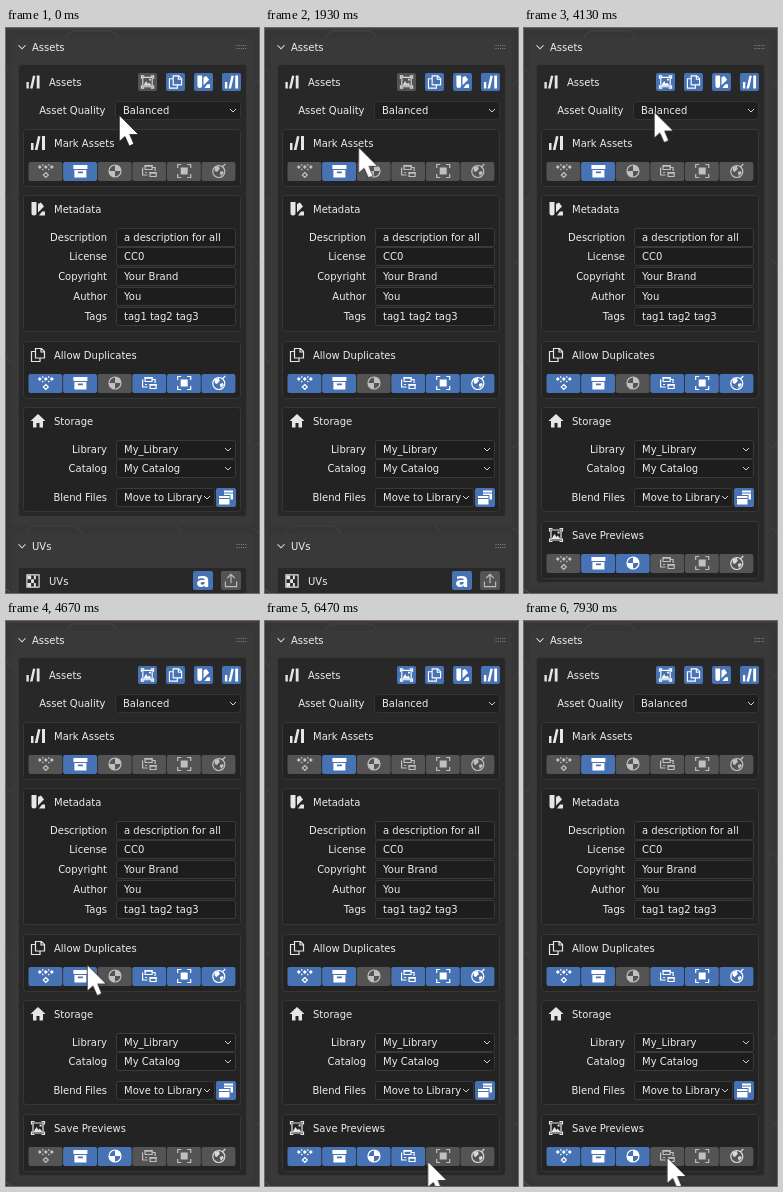
Write an HTML page that moves like this. It is 253x565 px and loops after 8 s.

```html
<!DOCTYPE html>
<html lang="en">
<head>
<meta charset="utf-8">
<title>Asset panel</title>
<style>
html, body { margin: 0; width: 100%; height: 100%; overflow: hidden; background: #363636; }
svg { display: block; width: 253px; height: 565px; }
text { font: 10px "DejaVu Sans", sans-serif; fill: #ececec; }
.off { fill: #545454; color: #c0c0c0; }
.on { fill: #4772b3; color: #fff; }
.early, .late, .anim, #cursor { animation: 8s step-end infinite; }
.early { animation-name: early; }
.late { animation-name: late; }
#cursor { animation-name: move; }

@keyframes early { 0% { opacity: 1 } 37.45%, 100% { opacity: 0 } }
@keyframes late { 0% { opacity: 0 } 37.45%, 100% { opacity: 1 } }

@keyframes preview {
  0% { fill: #545454; color: #d8d8d8 }
  29% { fill: #656565; color: #e6e6e6 }
  36.6% { fill: #4f7dc2; color: #fff }
  49.5%, 100% { fill: #4772b3; color: #fff }
}
@keyframes first {
  0% { fill: #545454; color: #c0c0c0 }
  67.5% { fill: #686868; color: #e0e0e0 }
  75.8%, 100% { fill: #4772b3; color: #fff }
}
@keyframes fourth {
  0%, 98.9%, 100% { fill: #545454; color: #c0c0c0 }
  80.4% { fill: #4772b3; color: #fff }
}
@keyframes fifth {
  0%, 97.5%, 100% { fill: #545454; color: #c0c0c0 }
  81.4% { fill: #4772b3; color: #fff }
}
@keyframes sixth {
  0%, 94.1%, 100% { fill: #545454; color: #d8d8d8 }
  83% { fill: #4772b3; color: #fff }
}

@keyframes move {
  0% { transform: translate(114px, 88px); animation-timing-function: cubic-bezier(.25, .45, .55, 1) }
  5.875% { transform: translate(59px, 175px) }
  16.7% { transform: translate(59px, 175px); animation-timing-function: cubic-bezier(.5, 0, .75, .47) }
  24.125% { transform: translate(94px, 120px); animation-timing-function: cubic-bezier(.33, .38, .67, .75) }
  27.5% { transform: translate(124px, 71px); animation-timing-function: cubic-bezier(.3, .57, .6, 1) }
  30.875% { transform: translate(137px, 52px) }
  48.3% { transform: translate(137px, 52px); animation-timing-function: cubic-bezier(.45, 0, .7, .55) }
  58.375% { transform: translate(82px, 344px); animation-timing-function: linear }
  59.125% { transform: translate(75.5px, 377px); animation-timing-function: cubic-bezier(.2, .58, .45, 1) }
  70.875% { transform: translate(45px, 538px) }
  75.06% { transform: translate(45px, 538px); animation-timing-function: cubic-bezier(.45, 0, .7, .6) }
  80.875% { transform: translate(163px, 541px); animation-timing-function: cubic-bezier(.2, .6, .45, 1) }
  87.5% { transform: translate(220px, 537px) }
  93.3% { transform: translate(220px, 537px); animation-timing-function: cubic-bezier(.45, 0, .75, .5) }
  99.125% { transform: translate(144px, 537px); animation-timing-function: linear }
  100% { transform: translate(124px, 537px) }
}
</style>
</head>
<body>
<svg id="stage" viewBox="0 0 253 565"></svg>
<script>
// Icons on a 16 x 16 grid: [filled path, stroked path]
const icons = {
  books: ['M1 8h2.500v7H1zM8 1l2.500 .6-3 13.400H4.800zM12 1h3v14h-3z', ''],
  image: ['M3.500 12l3-5 2 3 1.300-1.600 2.700 3.600zM9.600 4.400h2v2h-2z', 'M1.500 4.500V1.500h3M11.500 1.500h3v3M14.500 11.500v3h-3M4.500 14.500h-3v-3M3 3h10v10H3z'],
  copy: ['', 'M5.500 1.500h6l3 3v6.500h-9zM5.500 4.500h-4v10h8.500V11M11 1.500v3.500h3.500'],
  swatch: ['M1.500 1h5v11a2.500 2.500 0 0 1-5 0zM8 3l3-1.500 3 4-6 6zM9 14.500l3-4h3v4z', ''],
  shapes: ['M2 2l2 2-2 2-2-2zM8 2l2 2-2 2-2-2zM14 2l2 2-2 2-2-2zM5 1l1 1-1 1-1-1zM11 1l1 1-1 1-1-1zM5 5.500l1 1-1 1-1-1zM11 5.500l1 1-1 1-1-1z', 'M8 9.500l2.500 2.500L8 14.500 5.500 12z'],
  archive: ['M1 2h14v4H1zM2 7h12v7.500H2zM5.500 8.500v1.800h5V8.500z', ''],
  sphere: ['M8 2a6 6 0 0 1 6 6H8zM8 8v6a6 6 0 0 1-6-6z', 'M14 8a6 6 0 1 1-12 0a6 6 0 1 1 12 0z'],
  nodes: ['M3 2h8v1.800H3zM8 9h7v1.800H8z', 'M3.500 2.500h7v4h-7zM8.500 9.500h6v4h-6zM1 4.500v7.500h5M5.500 9.500H3.500M11 4.500h2.500V8'],
  corners: ['M4.500 4.500h7v7h-7z', 'M1.500 5V1.500H5M11 1.500h3.500V5M14.500 11v3.500H11M5 14.500H1.500V11'],
  globe: ['M4 4l4-1 1 3-3 3-2-1zM9 9l3-1 1 2-3 3z', 'M14 8.500a6 6 0 1 1-12 0a6 6 0 1 1 12 0zM11.500 4l3-3'],
  home: ['M8 1L.5 8H3v6.500h3.500V10h3v4.500H13V8h2.500z', ''],
  stack: ['M6 1h9v2H6zM6 4h9v6h-2.500V5.500H6zM1 6.500h10.500v2H1zM1 9.500h10.500V15H1z', ''],
  checker: ['M2 2h4v4H2zM6 6h3v4H6zM2 10h4v4H2zM9 2h2v4H9zM9 10h2v4H9z', 'M1.500 1.500h13v13h-13z'],
  share: ['', 'M2 9v5.500h12V9M8 11V1.500M4 5.500L8 1.500 12 5.500'],
  down: ['', 'M4 6l4 4 4-4']
};
const kinds = ['shapes', 'archive', 'sphere', 'nodes', 'corners', 'globe'];

const icon = (name, cx, cy, size = 14) => {
  const [fill, line] = icons[name], k = size / 16;
  return `<g transform="translate(${cx - size / 2} ${cy - size / 2}) scale(${k})">
    <path d="${fill}" fill="currentColor" fill-rule="evenodd"/>
    <path d="${line}" fill="none" stroke="currentColor" stroke-width="1.2"/></g>`;
};
const box = (x, y, w, h, fill, line = 'none', r = 3) =>
  `<rect x="${x + .5}" y="${y + .5}" width="${w - 1}" height="${h - 1}" rx="${r}" fill="${fill}" stroke="${line}"/>`;
const label = (s, x, y, anchor = 'start') => `<text x="${x}" y="${y}" text-anchor="${anchor}">${s}</text>`;
const group = (y, h, name, s) =>
  box(17, y, 218, h, '#232323', '#363636') + icon(name, 32, y + 14, 16) + label(s, 48, y + 18);

const button = (x, y, w, h, state, inner, anim = '') =>
  `<g class="${state}${anim && ' anim'}"${anim && ` style="animation-name:${anim}"`}>
    <rect x="${x}" y="${y}" width="${w}" height="${h}" rx="2"/>${inner}</g>`;
const tool = (name, x, state, anim) => button(x, 45, 19, 18, state, icon(name, x + 9.5, 54, 15), anim);
const row = (y, states, anims = []) => kinds.map((name, i) => {
  const w = 34.6, x = 22.5 + i * w;
  return button(x, y, w - .7, 19, +states[i] ? 'on' : 'off', icon(name, x + w / 2, y + 9, 16), anims[i] || '');
}).join('');

const field = (name, value, y, w = 120, arrow = false) =>
  label(name, 101, y + 13, 'end') + box(110, y, w, 19, '#1d1d1d', '#3a3a3a', 2) + label(value, 118, y + 13) +
  (arrow ? icon('down', 110 + w - 8, y + 9.500, 12) : '');

const header = (s, y) => {
  let dots = '';
  for (let i = 0; i < 10; i++) dots += `<rect x="${230.5 + i % 5 * 2.2}" y="${y - 2 + (i > 4 ? 3 : 0)}" width="1" height="1" fill="#8a8a8a"/>`;
  return icon('down', 16, y, 14) + label(s, 26, y + 4) + dots;
};
const panel = (y, end, boxY, boxEnd) =>
  box(5, y, 243, end - y, '#393939', 'none', 4) + box(12, boxY, 229, boxEnd - boxY, '#282828', '#363636');

const backdrop = `<rect width="253" height="565" fill="#363636"/>
  <path d="M0 1H253" stroke="#573c45"/>
  <path d="M0 40l5 6M0 172l5-4M0 330l5 5M248 58l5-6M248 232l5 5M248 420l5-5M60 9l6-6h40l6 6M20 505l6-7h44l6 7M170 498l6 7M248 500l5 5" fill="none" stroke="#444"/>
  <path d="M0 561l5 4" stroke="#8a4055"/>`;

const early = `<g class="early">${panel(9, 498, 36, 489)}${panel(505, 575, 539, 575)}
  ${header('UVs', 518)}${icon('checker', 27, 553, 15)}${label('UVs', 43, 557)}
  ${button(187, 543, 20, 19, 'on', '<text x="197" y="559" text-anchor="middle" style="font:bold 20px \'DejaVu Sans\',sans-serif;fill:#fff">a</text>')}
  ${button(215, 543, 20, 19, 'off', icon('share', 225, 552.5, 15))}</g>`;

const late = `<g class="late">${panel(9, 561, 36, 555)}
  ${group(493, 58, 'image', 'Save Previews')}
  ${row(526, '011000', ['first', '', '', 'fourth', 'fifth', 'sixth'])}</g>`;

const details = [
  ['Description', 'a description for all'], ['License', 'CC0'], ['Copyright', 'Your Brand'],
  ['Author', 'You'], ['Tags', 'tag1 tag2 tag3']
];

const content = header('Assets', 19) + icon('books', 27, 54, 15) + label('Assets', 43, 58) +
  tool('image', 132, 'off', 'preview') + tool('copy', 160, 'on') + tool('swatch', 188, 'on') + tool('books', 216, 'on') +
  label('Asset Quality', 99.5, 86, 'end') + box(109, 73, 126, 19, '#1f1f1f', '#343434') + label('Balanced', 117, 86) + icon('down', 227, 82.5, 12) +
  group(101, 58, 'books', 'Mark Assets') + row(134, '010000') +
  group(167, 137, 'swatch', 'Metadata') +
  details.map(([k, v], i) => field(k, v, Math.floor(200 + i * 19.8))).join('') +
  group(313, 58, 'copy', 'Allow Duplicates') + row(346, '110111') +
  group(379, 105, 'home', 'Storage') +
  field('Library', 'My_Library', 412, 120, true) + field('Catalog', 'My Catalog', 431, 120, true) +
  field('Blend Files', 'Move to Library', 460, 99, true) +
  button(210, 460, 20, 19, 'on', icon('stack', 220, 469.5, 16));

const cursor = `<g id="cursor"><path d="M-.7 -.7V25.500L5 20.500 9.200 30 13.800 28 9.800 18.500H18.500Z"
  fill="#fff" stroke="#151515" stroke-width=".7" stroke-linejoin="round"/></g>`;

document.getElementById('stage').innerHTML =
  `<g color="#e6e6e6">${backdrop}${early}${late}${content}${cursor}</g>`;
</script>
</body>
</html>
```
